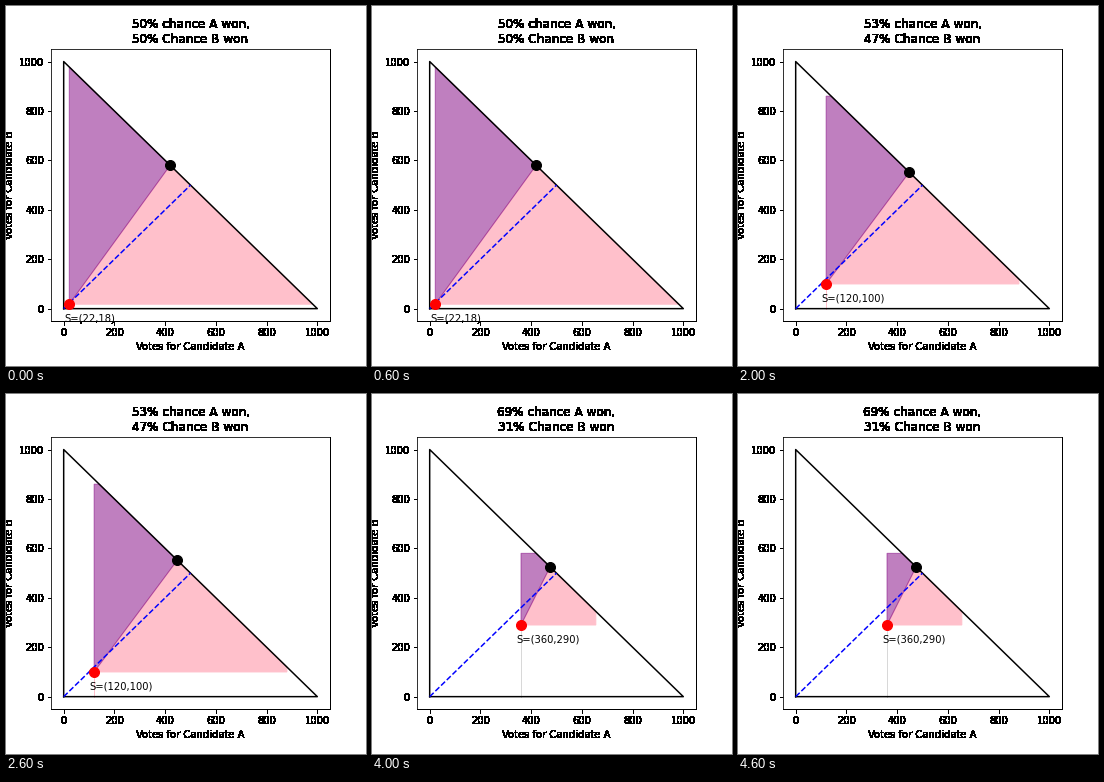
These frames come from a looping animation (360x360 px, 5 s). A matplotlib script:

```python
import numpy as np
import matplotlib.pyplot as plt
from matplotlib.animation import FuncAnimation
from matplotlib.patches import Polygon

TOTAL = 1000

# counted votes, chances (%), tie point x, purple top, pink right edge, drop line
STEPS = [
    ((22, 18), (50, 50), 420, 977, 982, "pink"),
    ((50, 40), (51, 49), 420, 948, 950, "pink"),
    ((120, 100), (53, 47), 448, 860, 880, "pink"),
    ((240, 200), (56, 43), 463, 720, 763, "pink"),
    ((360, 290), (69, 31), 475, 580, 655, "#d8d8d8"),
]


def harden(img, dpi):
    """Make every touched pixel opaque, for crisp text outside the plot."""
    out = np.rint(img * 255).astype(np.uint8)
    out[..., 3] = np.where(out[..., 3] > 0, 255, 0)
    return out, 0, 0


plt.rcParams.update({"font.family": "DejaVu Sans", "font.size": 10})
fig, ax = plt.subplots(figsize=(5, 5), dpi=72, facecolor="white")
fig.subplots_adjust(left=0.125, right=0.9, bottom=0.125, top=0.88)
ax.set_agg_filter(harden)
ax.set(xlim=(-50, 1050), ylim=(-50, 1050),
       xlabel="Votes for Candidate A", ylabel="Votes for Candidate B")
title = ax.set_title("", fontsize=12)


def add_area(color, **style):
    return ax.add_patch(Polygon([(0, 0)] * 3, color=color, lw=1, **style))


def add_dot(color):
    return ax.plot([], [], "o", color=color, ms=10, zorder=5)[0]


pink = add_area("pink", zorder=1)
purple = add_area("purple", alpha=0.5, zorder=1.2)
drop, = ax.plot([], [], lw=1, zorder=1.1)
ax.plot([0, 0, TOTAL, 0], [0, TOTAL, 0, 0], color="black", lw=1.5)
ax.plot([0, TOTAL / 2], [0, TOTAL / 2], "--", color="blue", lw=1.5)
tie = add_dot("black")
start = add_dot("red")
label = ax.text(0, 0, "", zorder=6)


def update(i):
    (a, b), (win_a, win_b), mid, top, right, shade = STEPS[i]
    goal = (mid, TOTAL - mid)
    purple.set_xy([(a, b), (a, top), (TOTAL - top, top), goal])
    pink.set_xy([(a, b), goal, (right, TOTAL - right), (right, b)])
    drop.set_data([a, a], [0, b])
    drop.set_color(shade)
    tie.set_data([goal[0]], [goal[1]])
    start.set_data([a], [b])
    label.set_position((a - 20, b - 70))
    label.set_text(f"S=({a},{b})")
    title.set_text(f"{win_a}% chance A won,\n{win_b}% Chance B won")
    return purple, pink, drop, tie, start, label, title


anim = FuncAnimation(fig, update, frames=len(STEPS), interval=1000,
                     repeat=True, repeat_delay=0, blit=False)
plt.show()
```
